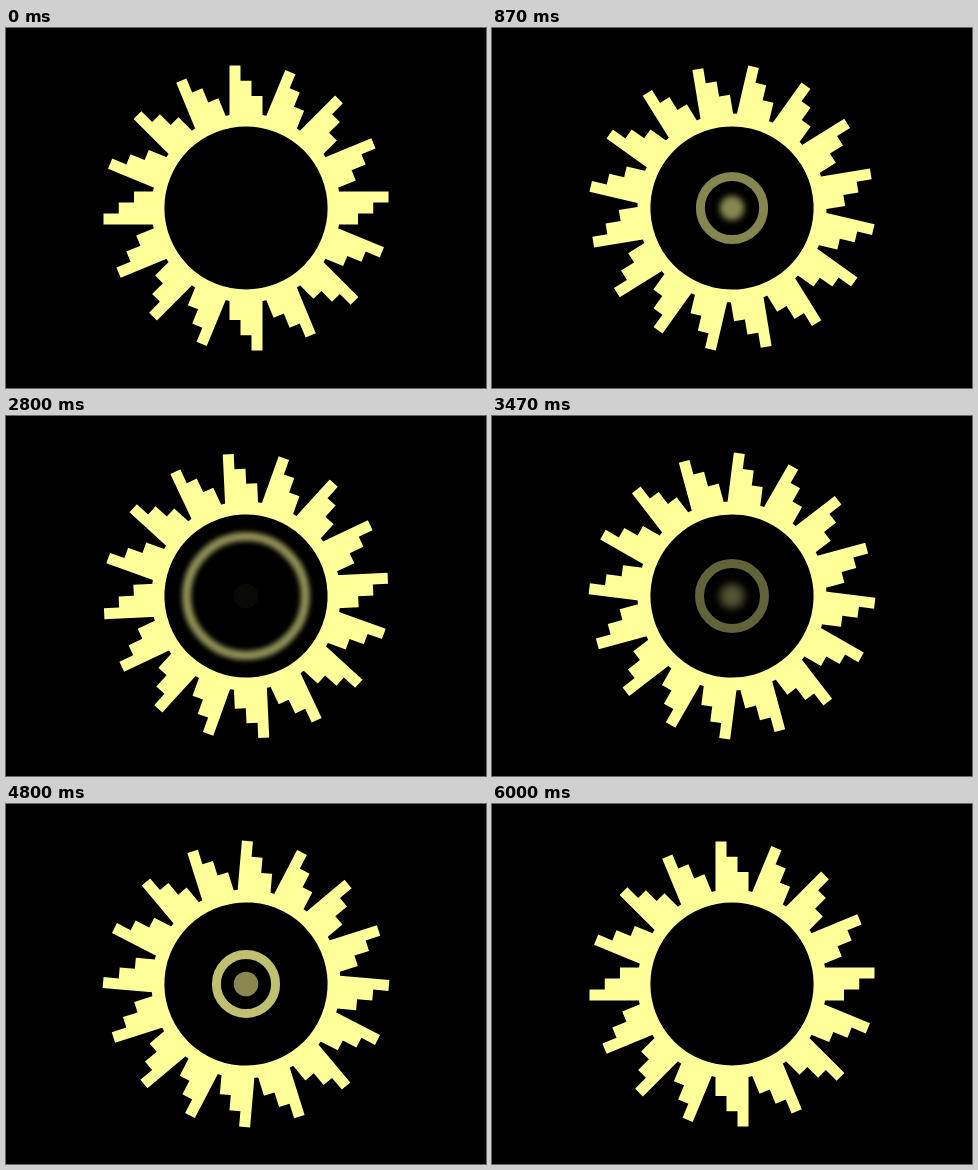
These frames come from a looping animation (480x360 px, 6070 ms). An HTML page:

```html
<!DOCTYPE html>
<html lang="en">
<head>
<meta charset="utf-8">
<title>Pulsing sun</title>
<style>
  html, body { margin: 0; width: 100%; height: 100%; overflow: hidden; background: #000; }
  svg { display: block; width: 100vw; height: 100vh; }
</style>
</head>
<body>
<svg viewBox="-240 -180 480 360" fill="#ff9">
  <defs>
    <path id="ray" d="M-16.5 -90V-142.5h11v15.25h11v15.25h11V-90Z"/>
  </defs>
  <g id="scene">
    <g id="sun">
      <circle r="88.05" fill="none" stroke="#ff9" stroke-width="12.9"/>
    </g>
    <circle id="ring" fill="none" stroke="#ff9" stroke-width="9"/>
    <circle id="dot" r="12.3"/>
  </g>
</svg>
<script>
  const LOOP = 6070, FPS = 15, RAYS = 16;
  const TURN = 90, TURN_TIME = 5.96;  // degrees, seconds
  const BEAT = 4, KICK_TIME = 0.26;   // seconds
  const RIPPLE = 3;                   // seconds
  const BURST = 0.6;                  // share of the ripple before the ring flies out

  const [scene, sun, ring, dot] = ['scene', 'sun', 'ring', 'dot'].map(id => document.getElementById(id));

  for (let i = 0; i < RAYS; i++) {
    const ray = document.createElementNS('http://www.w3.org/2000/svg', 'use');
    ray.setAttribute('href', '#ray');
    ray.setAttribute('transform', `rotate(${i * 360 / RAYS})`);
    sun.append(ray);
  }

  function setLook(el, alpha, blur) {
    el.style.opacity = alpha;
    el.style.filter = blur > 0.05 ? `blur(${blur}px)` : 'none';
  }

  function draw(t) {
    // Every beat the sun swells while the whole scene dims.
    const kick = Math.sin(Math.PI * Math.min(1, t % BEAT / KICK_TIME));
    const angle = TURN * Math.min(1, t / TURN_TIME);
    sun.setAttribute('transform', `rotate(${angle}) scale(${1 + 0.07 * kick})`);
    scene.style.opacity = 1 - 0.35 * kick;

    // The ring shrinks slowly, then bursts outwards; the dot comes into focus.
    const p = t % RIPPLE / RIPPLE;
    const q = Math.max(0, (p - BURST) / (1 - BURST));
    ring.setAttribute('r', 33.5 - 6.5 * p + 46 * q ** 2);
    setLook(ring, 0.97 * Math.sqrt(p) * (1 - q ** 5), 4 * kick + 4 * q ** 2);
    setLook(dot, 0.53 * Math.min(1, 4 * p) * (1 - q) ** 1.5, Math.max(0.7, 6 - 10 * p));
  }

  const start = performance.now();
  function tick() {
    const ms = (performance.now() - start) % LOOP;
    draw(Math.floor((ms + 5) * FPS / 1000) / FPS);  // the motion steps at 15 fps
    requestAnimationFrame(tick);
  }
  tick();
</script>
</body>
</html>
```
